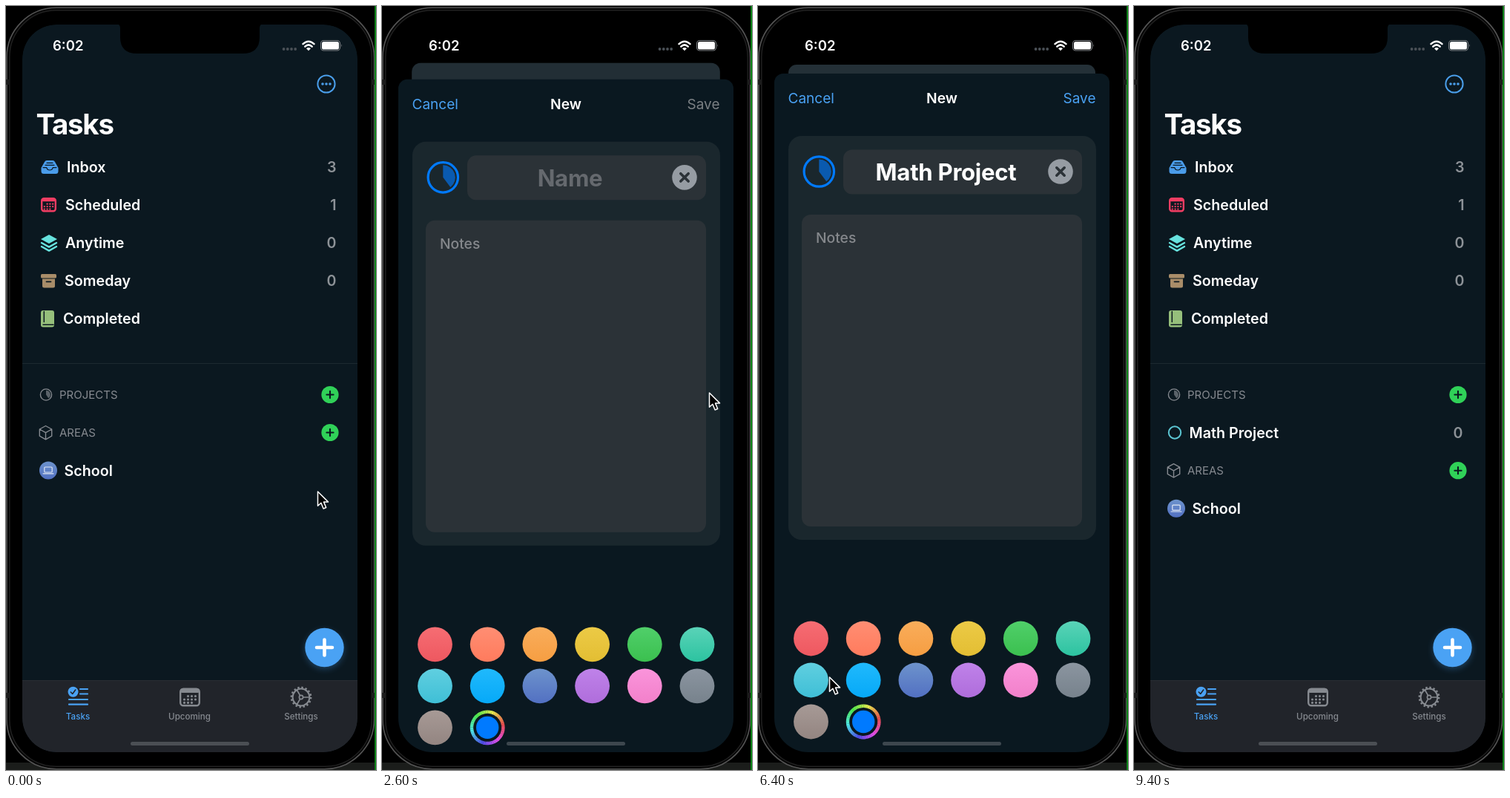
These frames come from a looping animation (499x1029 px, 9.9 s). An HTML page:

```html
<!DOCTYPE html>
<html lang="en">
<head>
<meta charset="utf-8">
<title>Task list</title>
<style>
  html, body { margin: 0; width: 100%; height: 100%; overflow: hidden; background: #000; }
  svg { display: block; width: 100vw; height: 100vh; }
  text {
    font: 600 19.7px Inter, "Open Sans", sans-serif;
    font-optical-sizing: none; fill: #fff; white-space: pre;
  }
</style>
</head>
<body>
<svg id="stage" viewBox="0 0 499 1029"></svg>
<script>
const LOOP = 9900, FRAME = 100;
const BG = '#0b1820', FIELD = '#2b3237', BLUE = '#4aa2f4', GRAY = '#868a90', GREEN = '#30d158';
const PICKED = '#007aff', CYAN = '#5fcbdc';
const TITLE = 'Math Project';

// Drawing helpers
const text = (x, y, s, attrs = '', style = '') => `<text x="${x}" y="${y}" ${attrs} style="${style}">${s}</text>`;
const rect = (x, y, w, h, r, fill, attrs = '') =>
  `<rect x="${x}" y="${y}" width="${w}" height="${h}" rx="${r}" fill="${fill}" ${attrs}/>`;
const circle = (x, y, r, fill, attrs = '') => `<circle cx="${x}" cy="${y}" r="${r}" fill="${fill}" ${attrs}/>`;
const ring = (x, y, r, color, width, attrs = '') =>
  circle(x, y, r, 'none', `stroke="${color}" stroke-width="${width}" ${attrs}`);
const line = (d, color, width, attrs = '') =>
  `<path d="${d}" fill="none" stroke="${color}" stroke-width="${width}" stroke-linecap="round" stroke-linejoin="round" ${attrs}/>`;
const fill = (d, color, attrs = '') => `<path d="${d}" fill="${color}" ${attrs}/>`;
const plus = (x, y, size, color, width) =>
  line(`M${x - size} ${y}h${2 * size}M${x} ${y - size}v${2 * size}`, color, width);
const range = (n, f) => Array.from({ length: n }, (_, i) => f(i)).join('');
const polar = (x, y, r, deg) => {
  const a = deg * Math.PI / 180;
  return `${(x + r * Math.sin(a)).toFixed(2)} ${(y - r * Math.cos(a)).toFixed(2)}`;
};
const pie = (x, y, r, deg, color, attrs = '') =>
  fill(`M${x} ${y}V${y - r}A${r} ${r} 0 0 1 ${polar(x, y, r, deg)}Z`, color, attrs);

function calendar(x, y, w, h, color) {
  const dx = w / 5.6, dy = h / 5.6;
  // Ten day dots on a 4 x 3 grid without its first and last place
  const dots = range(10, i => {
    const col = (i + 1) % 4, row = Math.floor((i + 1) / 4);
    return circle(x + w / 2 + (col - 1.5) * dx, y + h * .44 + row * dy, w / 18, color);
  });
  return rect(x + 1.2, y + 1.2, w - 2.4, h - 2.4, w / 7, 'none', `stroke="${color}" stroke-width="2.4"`) +
    rect(x + 1, y + 1, w - 2, h * .22, 2, color) + dots;
}

function gear(x, y, color) {
  return ring(x, y, 13.2, color, 2.4, 'stroke-dasharray="2.4 2.784"') + ring(x, y, 11.4, color, 2) + ring(x, y, 2.6, color, 1.6) +
    [90, 210, 330].map(a => line(`M${polar(x, y, 3.4, a)}L${polar(x, y, 11, a)}`, color, 1.7)).join('');
}

const menuIcons =
  fill('M47.5 218L52 210Q53 208 55 208H63Q65 208 66 210L70.5 218V222.5Q70.5 226 67 226H51Q47.5 226 47.5 222.5Z', '#4a9cea') +
  line('M55 211.3H63M53 214.3H65M50 217.6H54.8Q55.6 221 59 221T63.2 217.6H68', BG, 1.2) +
  calendar(47, 258, 21, 19.5, '#f23d63') +
  fill('M58 308L69 314L58 320L47 314Z', '#67e2de') +
  line('M48 319L58 324.6L68 319M48 324L58 329.6L68 324', '#67e2de', 2.4) +
  rect(47, 361, 21, 5.5, 1.5, '#a98d69') + fill('M49 367.5H66V377Q66 379.5 63.5 379.5H51.5Q49 379.5 49 377Z', '#a98d69') +
  line('M54.5 371.3H60.5', BG, 1.8) +
  rect(47, 410, 18, 22.5, 3, '#96bf7b') + line('M51.3 411.5V425.5M50 429.2H64', BG, 1.5);

const menu = [['Inbox', 82, 3], ['Scheduled', 80, 1], ['Anytime', 80, 0], ['Someday', 79, 0], ['Completed', 77, '']]
  .map(([name, x, count], i) => {
    const y = 224 + i * 51.1;
    return text(x, y, name) + text(445.5, y, count, 'text-anchor="end"', 'fill:#8d9297');
  }).join('');

const heading = (y, s) => text(72, y, s, '', `font-size:15px;font-weight:400;fill:${GRAY}`);
const tabLabel = (x, s, color) =>
  text(x, 961, s, 'text-anchor="middle"', `font-size:11.6px;font-weight:500;fill:${color}`);

const page = `
  ${rect(22, 25, 452, 980, 0, BG)}
  ${ring(432, 105, 11.6, '#4a9eea', 2)}${range(3, i => circle(427 + i * 5, 105, 1.8, '#4a9eea'))}
  ${text(40.5, 173, 'Tasks', '', 'font-size:38.5px;font-weight:700;letter-spacing:-.034em')}
  ${menuIcons}${menu}
  <path d="M22 481.5H474" stroke="#1c2930"/>
  ${ring(54, 523.5, 7.6, GRAY, 1.4)}${pie(54, 523.5, 5.8, 145, GRAY, 'opacity=".65"')}
  ${heading(529, 'PROJECTS')}
  ${circle(437, 523.5, 11.6, GREEN, 'id="add"')}${plus(437, 523.5, 4.6, BG, 2.1)}
  <g id="project">
    ${ring(55, 574.5, 8.2, '#5cc5d2', 2)}${text(74.5, 581.5, TITLE)}
    ${text(443.5, 581.5, 0, 'text-anchor="end"', 'fill:#8d9297')}
  </g>
  <g id="areas">
    ${line('M53.5 565.5L61.7 570V579.2L53.5 583.8L45.3 579.2V570ZM45.3 570L53.5 574.6L61.7 570M53.5 574.6V583.8', GRAY, 1.4)}
    ${heading(580, 'AREAS')}
    ${circle(437, 574.5, 11.6, GREEN)}${plus(437, 574.5, 4.6, BG, 2.1)}
    ${circle(57, 625.5, 12, 'url(#swatch8)')}
    ${rect(51.8, 621, 10.4, 7, 1, 'none', 'stroke="#dfe7f4" stroke-width="1.2"')}${line('M50 629.8H64', '#dfe7f4', 1.2)}
    ${text(78.5, 632.5, 'School')}
  </g>
  ${circle(429.5, 867, 26, BLUE, 'opacity=".3" filter="url(#blur)"')}
  ${circle(429.5, 864, 26.2, BLUE)}${plus(429.5, 864, 10.5, '#fff', 4.6)}
  ${rect(22, 908, 452, 97, 0, '#21242a')}<path d="M22 908.5H474" stroke="#292d33"/>
  ${circle(90.5, 923.8, 7, BLUE)}${line('M87.3 924L89.7 926.5L93.7 921', '#21242a', 1.6)}
  ${line('M100 920H110M100 926.5H110M85 934H110M85 940.7H110', BLUE, 2.2)}
  ${calendar(234, 918.5, 28, 25, GRAY)}${gear(398, 931, GRAY)}
  ${tabLabel(97, 'Tasks', BLUE)}${tabLabel(247.5, 'Upcoming', GRAY)}${tabLabel(398, 'Settings', GRAY)}
  ${rect(22, 25, 452, 980, 0, '#fff', 'id="tint"')}`;

const swatches = [
  ['#f66d73', '#ee5860'], ['#ff8e73', '#ff7b5d'], ['#f9ad5b', '#f69e42'], ['#ecca46', '#e3be33'],
  ['#50cf6a', '#3bc04f'], ['#5ad3b8', '#2cc3a0'], ['#60cfe0', '#3fbfd6'], ['#20b9fc', '#06a9f8'],
  ['#6d93cc', '#5270c2'], ['#bf82e9', '#af6ddb'], ['#fa94db', '#f280ca'], ['#8b95a0', '#77828c'], ['#a79a96', '#938581']];

const gradients = swatches.map(([top, bottom], i) =>
  `<linearGradient id="swatch${i}" x2="0" y2="1"><stop stop-color="${top}"/><stop offset="1" stop-color="${bottom}"/></linearGradient>`).join('');

const palette = swatches.map((_, i) =>
  circle(71.5 + i % 6 * 70.7, 852 + Math.floor(i / 6) * 56, 23.4, `url(#swatch${i})`)).join('');

const wheel = range(48, i => {
  const a = i * 7.5;
  return `<path d="M${polar(142.2, 964, 21.2, a)}A21.2 21.2 0 0 1 ${polar(142.2, 964, 21.2, a + 8.2)}"
    fill="none" stroke="hsl(${(435 - a) % 360} 75% 60%)" stroke-width="4.4"/>`;
});

const barText = 'font-size:19px;font-weight:400;fill:';
const sheet = `
  ${rect(22, 91, 452, 1000, 12, '#0a1820')}
  ${text(40.5, 131, 'Cancel', '', barText + BLUE)}
  ${text(248, 131, 'New', 'text-anchor="middle"', 'font-size:19.3px')}
  ${text(455.5, 131, 'Save', 'text-anchor="end" id="save"', barText + GRAY)}
  ${rect(41, 175, 415, 544, 18, '#1a272d')}
  ${rect(115, 193.5, 322, 60, 12, FIELD)}
  ${rect(59, 281, 378, 420, 12, FIELD)}
  <g id="icon">${ring(82.3, 223, 20.2, 'currentColor', 3.2)}${pie(82.3, 223, 16.5, 143, 'currentColor', 'opacity=".62"')}</g>
  ${text(253.5, 235, 'Name', 'text-anchor="middle" id="name"', 'font-size:31.2px;font-weight:700;letter-spacing:-.01em')}
  ${rect(0, 203, 2.6, 40, 1.3, BLUE, 'id="caret"')}
  ${circle(408, 223, 16.8, '#969ca3')}${line('M402.8 217.8l10.4 10.4m0-10.4l-10.4 10.4', FIELD, 3.6)}
  ${text(78, 319, 'Notes', '', 'font-size:19.3px;font-weight:500;fill:#85888c')}
  ${palette}${wheel}
  <g id="wheelCenter">${circle(142.2, 964, 15.2, 'currentColor')}</g>`;

const wifi = line('M400.5 51.2Q408 44.2 415.5 51.2M403.3 54.6Q408 50.2 412.7 54.6', '#fff', 2.5, 'stroke-linecap="butt"') +
  fill('M405 57.2Q408 54.6 411 57.2L408 60.3Z', '#fff');

const overlay = `
  ${fill('M150 24Q154 25 154 30V42Q154 64 177 64H319Q342 64 342 42V30Q342 25 346 24Z', '#000')}
  ${text(63, 60, '6:02', '', 'font-size:18.5px')}
  ${range(4, i => circle(374.6 + i * 5.2, 58, 1.9, '#4b5157'))}
  ${wifi}
  ${rect(424.5, 46.5, 26, 13.5, 4, 'none', 'stroke="#7c8084" stroke-width="1.1"')}
  ${rect(426, 48, 23, 10.5, 2.6, '#fff')}${fill('M452 51Q453.8 53.2 452 55.5Z', '#7c8084')}
  ${rect(168, 991, 160, 5, 2.5, '#8b8f94', 'opacity=".4"')}`;

const bands = [[0, 99], [0, 925], [493, 99], [493, 925]].map(([x, y]) => rect(x, y, 5, 7, 0, '#1c1c1c')).join('');
const phone = `
  ${rect(0, 0, 499, 1029, 0, '#000')}
  ${rect(0, 1019, 499, 10, 0, '#1b1d1b')}
  ${rect(1, 2.2, 495.6, 1025.6, 67, '#060606', 'stroke="#555" stroke-width="1.6"')}
  ${rect(4.8, 5.8, 488.4, 1018.4, 63, '#000', 'stroke="#212121" stroke-width="1.4"')}
  ${bands}
  ${rect(497.2, 0, 1.8, 1029, 0, '#0a8a16')}`;

const $ = id => document.getElementById(id);
$('stage').innerHTML = `
  <defs>${gradients}
    <filter id="blur" x="-50%" y="-50%" width="200%" height="200%"><feGaussianBlur stdDeviation="4"/></filter>
    <clipPath id="screen">${rect(22, 25, 452, 980, 46, '#000')}</clipPath>
    <clipPath id="pageClip">${rect(22, 25, 452, 980, 46, '#000', 'id="pageShape"')}</clipPath>
  </defs>
  ${phone}
  <g clip-path="url(#screen)">
    <g id="page" clip-path="url(#pageClip)">${page}</g>
    <g id="sheet">${sheet}</g>
  </g>
  ${overlay}
  <g id="cursor">${fill('M0 0V19.2L4.4 15.2L7.6 23L11.2 21.5L8 13.9H14Z', '#000', 'stroke="#fff" stroke-width="1.5" stroke-linejoin="round"')}</g>`;

// Motion
const clamp = v => Math.min(1, Math.max(0, v));
const smooth = v => (v = clamp(v), v * v * (3 - 2 * v));
const mix = (a, b, p) => a + (b - a) * p;
// Remaining distance of a critically damped spring
const spring = (ms, speed) => {
  const x = Math.max(0, ms) / 1000 * speed;
  return (1 + x) * Math.exp(-x);
};

const OPEN = 2300, CLOSE = 8050, TYPE = 4200, KEY = 130, RECOLOR = 6600;
const cursorPath = [[900, 420.5, 654], [1400, 464, 575], [1900, 441.5, 521], [2900, 441.5, 521], [3700, 265.5, 229],
  [5800, 265.5, 229], [6300, 96.5, 904], [6900, 96.5, 904], [7500, 450, 107], [7800, 439.5, 127.5]];

function cursorAt(t) {
  const next = cursorPath.findIndex(key => key[0] > t);
  if (next === 0) return cursorPath[0].slice(1);
  if (next < 0) return cursorPath.at(-1).slice(1);
  const [t0, x0, y0] = cursorPath[next - 1], [t1, x1, y1] = cursorPath[next];
  const p = smooth((t - t0) / (t1 - t0));
  return [mix(x0, x1, p), mix(y0, y1, p)];
}

const shown = (id, on) => $(id).setAttribute('visibility', on ? 'visible' : 'hidden');

function draw(t) {
  const presented = speed => t < CLOSE ? 1 - spring(t - OPEN, speed) : spring(t - CLOSE, speed);
  const front = presented(22.8), back = presented(16);
  const scale = mix(1, .916, back);

  $('page').setAttribute('transform', `translate(${248 * (1 - scale)} ${mix(25, 79, back) - 25 * scale}) scale(${scale})`);
  $('pageShape').setAttribute('rx', mix(46, 12, back));
  $('tint').setAttribute('opacity', .1 * back);
  $('sheet').setAttribute('transform', `translate(0 ${938 * (1 - front)})`);
  shown('sheet', front > .001);
  $('add').setAttribute('fill', t >= 2200 && t < 2500 ? '#25a345' : GREEN);

  const added = smooth((t - 8200) / 400);
  $('project').setAttribute('opacity', added);
  $('areas').setAttribute('transform', `translate(0 ${51.2 * added})`);

  const typed = TITLE.slice(0, Math.max(0, Math.floor((t - TYPE) / KEY) + 1));
  const name = $('name');
  name.textContent = typed || 'Name';
  name.style.fill = typed ? '#fff' : '#65696e';
  const half = name.getComputedTextLength() / 2;
  $('caret').setAttribute('x', typed ? 253.5 + half : 252 - half);
  shown('caret', front > .5 && t >= 3800 && t < 5900);
  $('save').style.fill = !typed ? '#7b8084' : t >= 7900 ? '#24496c' : BLUE;

  for (const id of ['icon', 'wheelCenter']) $(id).setAttribute('color', t < RECOLOR ? PICKED : CYAN);

  $('cursor').setAttribute('transform', `translate(${cursorAt(t)})`);
  shown('cursor', t < TYPE || (t >= 5900 && t < 8500));
}

function tick() {
  draw(Math.floor(performance.now() % LOOP / FRAME) * FRAME);
  requestAnimationFrame(tick);
}
tick();
</script>
</body>
</html>
```
